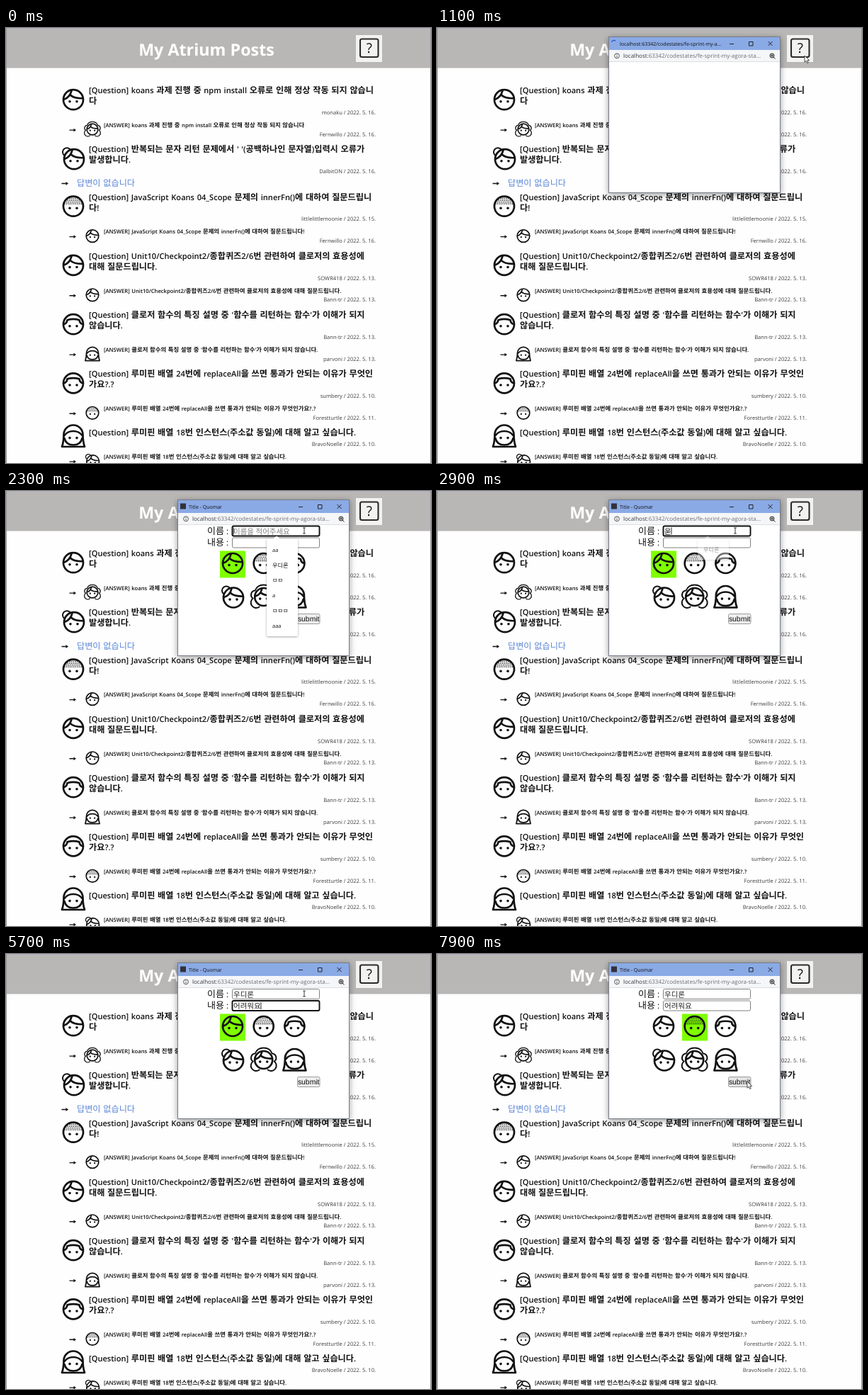
An HTML page that plays this animation: 600 px wide and 614 px high, repeating every 8 s.

```html
<!DOCTYPE html>
<html lang="ko">
<head>
<meta charset="utf-8">
<title>Question board</title>
<style>
  html, body { margin: 0; width: 100%; height: 100%; overflow: hidden; background: #fefefe; }
  svg { display: block; }
  text {
    font-family: "Open Sans", "Noto Sans CJK KR", "Noto Sans CJK", sans-serif;
    white-space: pre; text-rendering: geometricPrecision; fill: #111;
  }
  .bold { font-weight: 600; word-spacing: .075em; }
  .bold tspan { font-weight: 700; }
  .none tspan { font-weight: 500; }
  .meta { font-size: 7.6px; fill: #3c3c3c; text-anchor: end; }
  .face { fill: none; stroke: #111; stroke-width: 2.7; stroke-linecap: round; stroke-linejoin: round; }
  .eye { fill: #111; stroke: none; }
  .thin { stroke-width: 2; }
  .ui { fill: none; stroke: #222; stroke-width: 1; }
</style>
</head>
<body>
<svg width="600" height="614" viewBox="0 0 600 614">
  <defs>
    <filter id="shadow" x="-10%" y="-10%" width="120%" height="125%">
      <feDropShadow dx="0" dy="2" stdDeviation="4" flood-opacity=".4"/>
    </filter>
    <filter id="soft" x="-20%" y="-10%" width="140%" height="120%">
      <feDropShadow dx="0" dy="1" stdDeviation="1.5" flood-opacity=".35"/>
    </filter>
    <g id="eyes">
      <circle class="eye" cx="-5" cy="2.6" r="1.8"/>
      <circle class="eye" cx="5" cy="2.6" r="1.8"/>
    </g>
    <g id="head"><circle r="14"/><use href="#eyes"/></g>
    <path id="swoop" d="M-13 -.5Q-5 -3 -2.5 -12.5M-4.5 -7Q1 -1.5 13 -2"/>
    <g id="side"><use href="#head"/><use href="#swoop"/></g>
    <g id="buzz">
      <use href="#head"/>
      <path stroke-width="1.3" stroke-linecap="butt" stroke-dasharray="1.4 1.2" d="M-13 -3.5H13M-12.5 -6.1H12.5M-11 -8.7H11M-8 -11.3H8"/>
    </g>
    <g id="fringe"><use href="#head"/><path d="M-13.5 0Q-9 -1 -8.5 -6Q0 -8.5 8.5 -6Q9 -1 13.5 0"/></g>
    <g id="bun">
      <g transform="translate(1 1)"><use href="#head"/><use href="#swoop"/></g>
      <path class="thin" d="M-13.5 -5A5.6 5.6 0 1 1 -4.5 -13"/>
    </g>
    <g id="curls">
      <circle r="12.5"/><use href="#eyes"/>
      <path d="M-11.5 -1Q-4.5 -3 -2.5 -11M-4 -6Q1 -1.5 11.5 -2"/>
      <path class="thin" d="M-12 -9Q-9 -17 0 -17Q9 -17 12 -9A6 6 0 0 1 15 2A7.5 7.5 0 1 1 6 14M-12 -9A6 6 0 0 0 -15 2A7.5 7.5 0 1 0 -6 14"/>
    </g>
    <g id="long">
      <path d="M-16 15Q-13.5 8 -13.5 -2A13.5 13.5 0 0 1 13.5 -2Q13.5 8 16 15Z"/>
      <path d="M-12.5 3Q-10.5 12.5 0 12.5Q10.5 12.5 12.5 3"/>
      <path d="M-12.5 -1Q-8 -7 0 -7Q8 -7 12.5 -1"/>
      <use href="#eyes"/>
    </g>
    <path id="arrow" d="M.5 -.7H6.5V-2.4L10 0L6.5 2.4V.7H.5Z" fill="#111"/>
  </defs>

  <rect width="600" height="614" fill="#fefefe"/>
  <rect width="600" height="56.5" fill="#b9b7b6"/>
  <rect width="600" height="1" fill="#b0aec3"/>
  <path d="M.5 0V614M599.5 0V614" stroke="#98979b"/>
  <text x="283" y="38.5" text-anchor="middle" font-size="23.3" font-weight="700" style="fill:#fff">My Atrium Posts</text>
  <rect x="494" y="10" width="37" height="38" fill="#f2f2f1"/>
  <rect x="500" y="15.5" width="25.5" height="25.5" rx="2.5" fill="none" stroke="#2a2a2a" stroke-width="2.1"/>
  <text x="512.8" y="35" text-anchor="middle" font-size="19" font-weight="500">?</text>

  <g id="list"></g>

  <g id="popup">
    <rect x="242.5" y="12.5" width="242" height="220" fill="#fff" stroke="#767b86" filter="url(#shadow)"/>
    <rect x="243" y="13" width="241" height="18" fill="#8aaae6"/>
    <rect x="243" y="31" width="241" height="16" fill="#f5f6f8"/>
    <path d="M243 47.5H484" stroke="#dcdee2"/>
    <path id="spinner" d="M250 17.5A4 4 0 0 1 254 21.5" fill="none" stroke="#2257c4" stroke-width="1.4"/>
    <rect id="favicon" x="246" y="17.5" width="8" height="8" fill="#33303a"/>
    <text id="caption" x="258" y="24.6" font-size="7"></text>
    <path class="ui" d="M413 22.5H419M440.5 19.5H446V25H440.5ZM467.5 19L473.5 25M473.5 19L467.5 25"/>
    <circle class="ui" cx="254" cy="39.3" r="3.4" style="stroke:#555"/>
    <path d="M254 38.8V41.2M254 37V37.8" stroke="#555"/>
    <text x="263" y="42.2" font-size="8" style="fill:#6a6d72"><tspan fill="#34373b">localhost</tspan>:63342/codestates/fe-sprint-my-agora-sta...</text>
    <path class="ui" d="M475 41L477.5 43.5M471 39H475M473 37V41"/>
    <circle class="ui" cx="473" cy="39" r="3"/>
    <g id="form">
      <rect id="pick" y="84.5" width="36" height="38" fill="#7fff00"/>
      <g id="faces"></g>
      <rect id="submit" x="411.5" y="173.5" width="31.5" height="14" rx="2" stroke="#858585" stroke-width=".8"/>
      <text x="427.2" y="184" text-anchor="middle" font-size="10.4" style="font-family:'Liberation Sans',Arial,sans-serif">submit</text>
    </g>
    <g id="menu">
      <rect id="sheet" x="368" y="67" width="44" rx="2" fill="#fff" filter="url(#soft)"/>
      <path d="M377 67.5L382 63.5L387 67.5Z" fill="#fff"/>
      <g id="items"></g>
    </g>
  </g>

  <path id="pointer" d="M0 0V9.2L2.2 7.3L3.7 10.5L5.2 9.8L3.8 6.7H6.7Z" fill="#fff" stroke="#222" stroke-width=".8"/>
  <path id="beam" d="M-1.8 -4H1.8M0 -4V4M-1.8 4H1.8" fill="none" stroke="#222" stroke-width=".9"/>
</svg>

<script>
const LOOP = 8000, STEP = 100;
const $ = id => document.getElementById(id);
const show = (id, on) => $(id).setAttribute('visibility', on ? 'inherit' : 'hidden');

// Hangul is set slightly larger than the Latin text around it.
const mix = (str, size) =>
  str.replace(/[ㄱ-ㅎ가-힣]+/g, run => `<tspan font-size="${size}">${run}</tspan>`);
const label = (x, y, str, size, attrs = '') =>
  `<text x="${x}" y="${y}" font-size="${size * .912}" ${attrs}>${mix(str, size)}</text>`;
const avatar = (kind, x, y, scale = 1) =>
  `<use href="#${kind}" class="face" transform="translate(${x} ${y}) scale(${scale})"/>`;
const meta = (y, who, day) => `<text class="meta" x="522" y="${y}">${who} / 2022. 5. ${day}.</text>`;
const arrow = (x, y) => `<use href="#arrow" x="${x}" y="${y}"/>`;

// Each post: first baseline, face, lines, author and day, then the answer.
const posts = [
  { y: 92, face: 'side', lines: ['koans 과제 진행 중 npm install 오류로 인해 정상 작동 되지 않습니', '다'],
    by: ['monaku', 16], reply: ['curls', 'Fernwillo', 16] },
  { y: 175, face: 'bun', lines: ["반복되는 문자 리턴 문제에서 ' '(공백하나인 문자열)입력시 오류가", '발생합니다.'],
    by: ['DalbitON', 16] },
  { y: 242.5, face: 'buzz', lines: ['JavaScript Koans 04_Scope 문제의 innerFn()에 대하여 질문드립니', '다!'],
    by: ['littlelittlemoonie', 15], reply: ['side', 'Fernwillo', 16] },
  { y: 325.7, face: 'side', lines: ['Unit10/Checkpoint2/종합퀴즈2/6번 관련하여 클로저의 효용성에', '대해 질문드립니다.'],
    by: ['SOWR418', 13], reply: ['side', 'Bann-tr', 13] },
  { y: 409, face: 'fringe', lines: ["클로저 함수의 특징 설명 중 '함수를 리턴하는 함수'가 이해가 되지", '않습니다.'],
    by: ['Bann-tr', 13], reply: ['long', 'parvoni', 13] },
  { y: 492.2, face: 'fringe', lines: ['루미핀 배열 24번에 replaceAll을 쓰면 통과가 안되는 이유가 무엇인', '가요?.?'],
    by: ['sumbery', 10], reply: ['buzz', 'Forestturtle', 11] },
  { y: 575, face: 'long', lines: ['루미핀 배열 18번 인스턴스(주소값 동일)에 대해 알고 싶습니다.'],
    by: ['BravoNoelle', 10], reply: ['bun', 'Fernwillo', 11] },
];

function postMarkup({ y, face, lines, by, reply }) {
  const last = y + 15 * (lines.length - 1);
  let out = avatar(face, 95, lines.length > 1 ? y + 9.2 : y + 1);
  lines.forEach((line, i) => {
    out += label(117, y + 15 * i, (i ? '' : '[Question] ') + line, 12.17, 'class="bold"');
  });
  out += meta(last + 14.8, ...by);
  if (!reply) {
    return out + arrow(78, last + 29.5) +
      label(100, last + 33, '답변이 없습니다', 12.17, 'class="bold none" style="fill:#5b86d8"');
  }
  const [kind, who, day] = reply;
  const base = last + 32.8;
  const glue = lines.length > 1 && /^(다|가)/.test(lines[1]) ? '' : ' ';
  out += arrow(89, base + 4.3) + avatar(kind, 122, base + 3.3, .63);
  out += label(138, base, '[ANSWER] ' + lines.join(glue), 8.4, 'class="bold"');
  return out + meta(base + 12.8, who, day);
}
$('list').innerHTML = posts.map(postMarkup).join('');

// Form
const NAME = '우디론', fields = ['이름', '내용'].map((title, i) => {
  const y = 49.5 + 16.5 * i;
  $('form').insertAdjacentHTML('beforeend',
    label(284, 60.5 + 16 * i, title + ' :', 13) +
    `<rect x="319.5" y="${y}" width="123" height="14" rx="2" fill="#fff"/>` +
    label(321, y + 11, '', 10.5) +
    `<path d="M0 ${y + 2}v10" stroke="#111" stroke-width=".9"/>`);
  const [caret, text, box] = [...$('form').children].reverse();
  return { box, text, caret };
});
$('faces').innerHTML = ['side', 'buzz', 'fringe', 'bun', 'curls', 'long']
  .map((kind, i) => avatar(kind, 320 + 43.7 * (i % 3), i < 3 ? 102 : 149.5)).join('');

const hints = ['aa', NAME, 'ㅁㅁ', 'a', 'ㅁㅁㅁ', 'aaa'];
const menuMarkup = words => words.map((w, i) => label(376, 86.2 + 21.4 * i, w, 8.2)).join('');

// Timelines: [time, value]
const at = (table, t) => table.reduce((value, [start, v]) => t >= start ? v : value, '');
const typing = [
  [[2700, 'ㅇ'], [2800, '우'], [2900, '욷'], [3000, '우디'], [3300, '우딜'], [3400, '우디로'], [3600, NAME]],
  [[4600, 'ㅇ'], [4700, '어'], [4800, '얼'], [4900, '어려'], [5000, '어령'], [5100, '어려우'],
   [5200, '어려워'], [5300, '어려웡'], [5500, '어려워요']],
];
const focus = [[0, -1], [1900, 0], [4000, 1], [6700, -1]];
const fade = [[0, 0], [2000, 1], [2900, .4], [3000, 0]];
const path = [[200, 582, 105], [700, 519, 39], [1300, 519, 39], [1800, 421, 56], [6000, 421, 56],
  [6500, 366, 105], [6900, 366, 105], [7500, 438, 180], [LOOP, 438, 180]];

function cursorAt(t) {
  const i = path.findIndex(p => p[0] > t);
  const [t0, x0, y0] = path[i - 1], [t1, x1, y1] = path[i];
  const k = (t - t0) / (t1 - t0), e = k * k * (3 - 2 * k);
  return [x0 + (x1 - x0) * e, y0 + (y1 - y0) * e];
}

function drawField({ box, text, caret }, value, focused, hint) {
  box.setAttribute('stroke', focused ? '#101010' : '#808080');
  box.setAttribute('stroke-width', focused ? 1.9 : 1);
  text.innerHTML = mix(value || hint, 10.5);
  text.style.fill = value ? '#222' : '#808080';
  const end = value ? text.getComputedTextLength() : 0;
  caret.setAttribute('transform', `translate(${321.3 + end} 0)`);
  caret.setAttribute('visibility', focused ? 'inherit' : 'hidden');
}

function render(t) {
  const loaded = t >= 1400;
  show('popup', t >= 1000);
  show('form', loaded);
  show('favicon', loaded);
  show('spinner', !loaded);
  $('spinner').setAttribute('transform', `rotate(${(t - 1100) * .45 - 60} 250 21.5)`);
  $('caption').textContent = loaded ? 'Title - Quomar' : 'localhost:63342/codestates/fe-sprint-my-a...';

  if (loaded) {
    const active = at(focus, t);
    fields.forEach((f, i) => drawField(f, at(typing[i], t), active === i, i ? '' : '이름을 적어주세요'));
  } else {
    fields.forEach(f => f.caret.setAttribute('visibility', 'hidden'));
  }

  const few = t >= 2800;
  $('menu').setAttribute('opacity', at(fade, t));
  $('sheet').setAttribute('height', few ? 30 : 138);
  $('items').innerHTML = menuMarkup(few ? [NAME] : hints);
  $('pick').setAttribute('x', t >= 6700 ? 346 : 302);

  const moving = t >= 200;
  const [x, y] = moving ? cursorAt(t) : [0, 0];
  const overField = loaded && x > 319 && x < 443 && y > 49 && y < 81;
  $('submit').setAttribute('fill', x > 411 && x < 443 && y > 173 && y < 188 ? '#e4e4e4' : '#efefef');
  for (const id of ['pointer', 'beam']) {
    $(id).setAttribute('transform', `translate(${x} ${y})`);
    show(id, moving && overField === (id === 'beam'));
  }
}

let shown = -1;
const begin = performance.now();
function tick() {
  const elapsed = Math.max(0, performance.now() - begin) % LOOP;
  const t = Math.floor(elapsed / STEP) * STEP;
  if (t !== shown) render(shown = t);
  requestAnimationFrame(tick);
}
tick();
</script>
</body>
</html>
```
